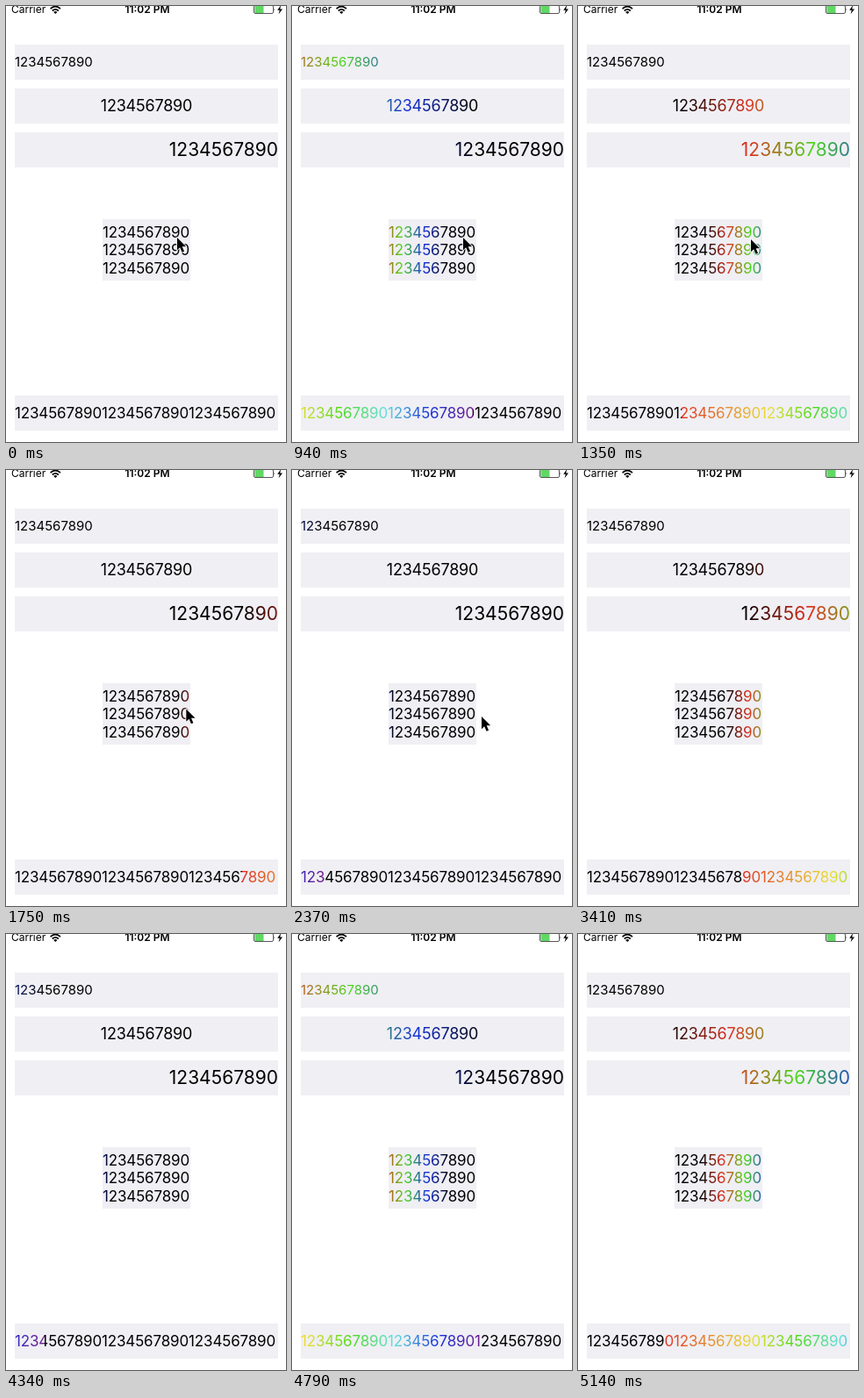
These frames come from a looping animation (319 by 497 pixels, 5240 ms). An HTML page:

```html
<!DOCTYPE html>
<html lang="en">
<head>
<meta charset="utf-8">
<title>Shimmering labels</title>
<style>
html, body { margin: 0; width: 100%; height: 100%; overflow: hidden; background: #fff; }
body { position: relative; font-family: Inter, Roboto, sans-serif; color: #000; }
.box { position: absolute; left: 10px; width: 300px; height: 40px; background: #efeff4; }
.label {
  width: 100%; height: 100%; line-height: 40px; white-space: pre;
  background: var(--ramp) var(--x, -400px) 0 / 100% 100% no-repeat #000;
  -webkit-background-clip: text; background-clip: text;
  color: transparent; -webkit-text-fill-color: transparent;
  --ramp: linear-gradient(90deg, #000, #e0301e, #4cd91a, #1530dc, #000);
}
#a { top: 44px; font-size: 15px; }
#b { top: 94px; font-size: 18px; letter-spacing: -.012em; text-align: center; }
#c { top: 144px; font-size: 21px; text-align: right; }
#d { top: 243px; left: 110px; width: 100px; height: 70px; font-size: 17px; letter-spacing: -.009em; }
#d .label { box-sizing: border-box; padding-top: 5px; line-height: 20.3px; }
#e { top: 444px; font-size: 17px; letter-spacing: -.009em; }
#e .label {
  --ramp: linear-gradient(90deg, #e0301e, #e68a2e, #ecdf35, #4cd91a, #62e0dc, #1530dc, #731c8c);
}
.bar { position: absolute; top: -6px; font-size: 12px; line-height: 20px; white-space: pre; }
svg { position: absolute; left: 0; top: 0; overflow: visible; }
</style>
</head>
<body>
<div class="bar" style="left:6px">Carrier</div>
<div class="bar" style="left:101px;width:120px;text-align:center;font-weight:600">11:02 PM</div>

<div class="box" id="a"><div class="label">1234567890</div></div>
<div class="box" id="b"><div class="label">1234567890</div></div>
<div class="box" id="c"><div class="label">1234567890</div></div>
<div class="box" id="d"><div class="label">1234567890
1234567890
1234567890</div></div>
<div class="box" id="e"><div class="label">123456789012345678901234567890</div></div>

<svg width="319" height="20">
  <g fill="none" stroke="#000" stroke-width="1.7">
    <path d="M50.6 3.2Q56.3 -2.2 62 3.2"/>
    <path d="M52.8 5.5Q56.3 2.3 59.8 5.5"/>
  </g>
  <path d="M56.3 9L54.2 6.9Q56.3 5.3 58.4 6.9Z"/>
  <rect x="282.5" y="-.5" width="22" height="9" rx="1.5" fill="#fff" stroke="#555"/>
  <rect x="283.5" y="0" width="10" height="8" fill="#5fd964"/>
  <path d="M305.5 2.5Q307.2 4 305.5 5.5Z" fill="#444"/>
  <path d="M313.2 -1L309.2 4.7H311.8L310.6 9.2L315 3.4H312.2Z"/>
</svg>
<svg width="12" height="18" id="cursor">
  <path d="M0 0V14.2L3.2 11.2L5.6 16.8L8.1 15.7L5.7 10.2H10.2Z"
    stroke="#fff" stroke-width="1.6" stroke-linejoin="round" paint-order="stroke"/>
</svg>

<script>
const LOOP = 5240, STEP = 57.75;   // ms
const SWEEP = 1924, DELAY = 160;   // one pass of the colours, and its first start

// [ms, step index]: the picture advances in discrete steps
const pace = [[0, 0], [240, 4], [820, 14], [1350, 23], [1920, 33], [2480, 43],
  [3060, 53], [3640, 63], [4180, 72], [4740, 82], [5140, 89], [5240, 89]];

// [step index, x, y]
const path = [[0, 195, 264], [22, 195, 264], [23, 197, 266], [39, 216, 281],
  [52, 216, 281], [58, 232, 500], [99, 232, 500]];

const labels = [...document.querySelectorAll('.label')];
const widths = labels.map(el => el.clientWidth);
const cursor = document.getElementById('cursor');

function lookup(keys, at, col = 1) {
  const i = Math.max(1, keys.findIndex(k => k[0] > at));
  const p = keys[i - 1], q = keys[i];
  return p[col] + (q[col] - p[col]) * (at - p[0]) / (q[0] - p[0]);
}

// cubic-bezier(.42, 0, .58, 1)
function easeInOut(x) {
  let lo = 0, hi = 1;
  for (let i = 0; i < 24; i++) {
    const u = (lo + hi) / 2, v = 1 - u;
    if (1.26 * v * v * u + 1.74 * v * u * u + u * u * u < x) lo = u; else hi = u;
  }
  return lo * lo * (3 - 2 * lo);
}

function draw(ms) {
  const n = Math.floor(lookup(pace, ms) + .2);
  const phase = Math.max(0, (n * STEP - DELAY) / SWEEP) % 1;
  const shift = 2 * easeInOut(phase) - 1;
  labels.forEach((el, i) => el.style.setProperty('--x', shift * widths[i] + 'px'));
  cursor.style.transform = `translate(${lookup(path, n)}px, ${lookup(path, n, 2)}px)`;
}

const start = performance.now();
function tick() {
  draw((performance.now() - start) % LOOP);
  requestAnimationFrame(tick);
}
tick();
</script>
</body>
</html>
```
